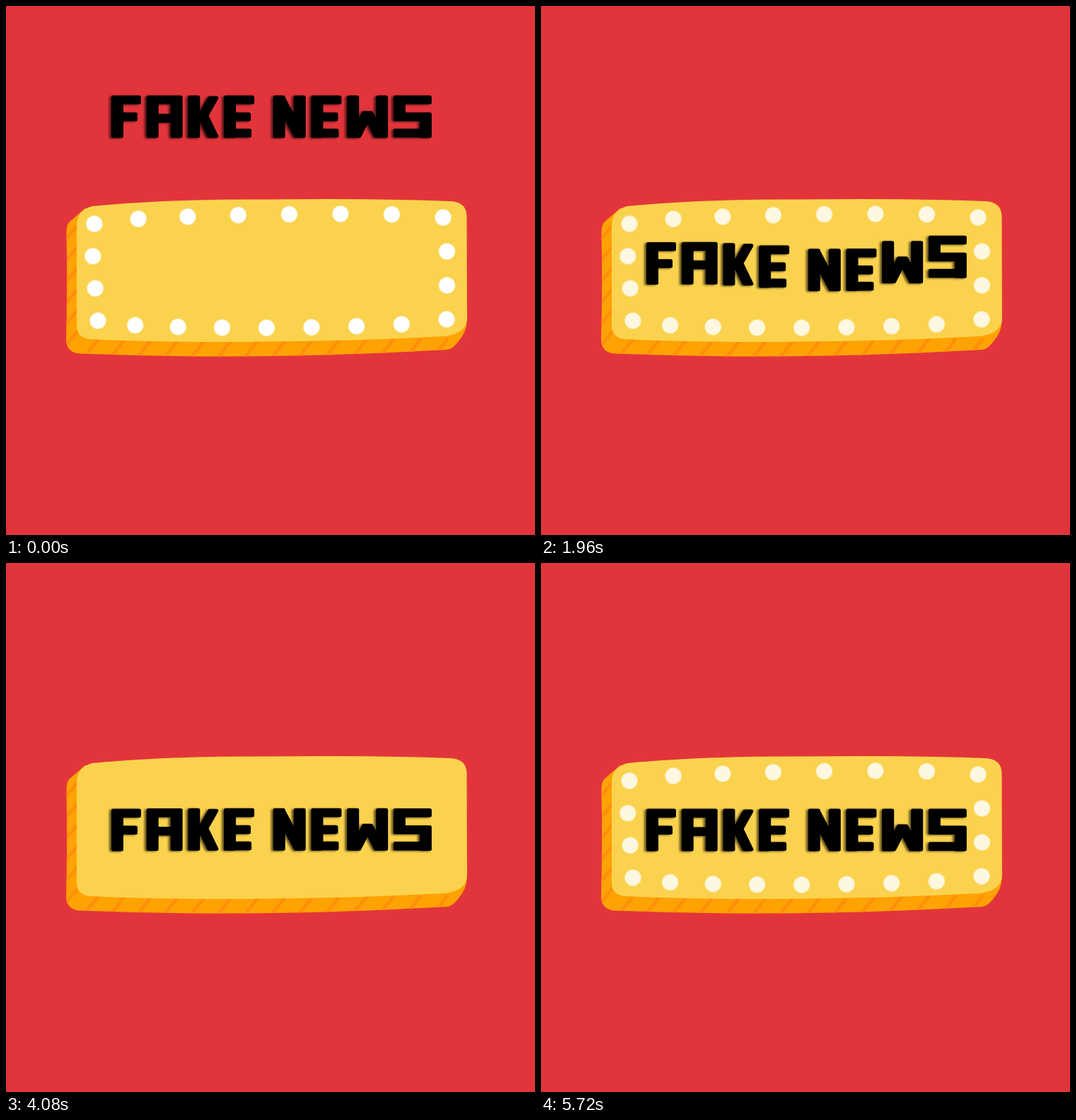
An HTML page for the animation above (5.76 s loop, 748 by 748 pixels).

```html
<!DOCTYPE html>
<html lang="en">
<head>
<meta charset="utf-8">
<title>FAKE NEWS</title>
<style>
html, body { margin: 0; width: 100%; height: 100%; overflow: hidden; background: #e2353b; }
svg { display: block; width: 100%; height: 100%; }
#letters path {
  stroke: #000; stroke-width: 5; stroke-linejoin: round;
  filter: drop-shadow(-2.5px 1.5px 1.5px rgba(0, 0, 0, .6));
}
</style>
</head>
<body>
<svg viewBox="0 0 748 748" role="img" aria-label="FAKE NEWS">
  <clipPath id="edge"><use href="#side"/></clipPath>
  <path id="side" fill="#ffa204" d="M112 286L90 305Q85 310 85.500 322Q87 400 85 473Q86 490 104 491.500Q320 500 545 490L624 486Q632 485 640 474Q652 460 651.500 445L640 300Z"/>
  <path id="stripes" clip-path="url(#edge)" stroke="#ff8f08" stroke-width="4.500"/>
  <path fill="#fbd24d" d="M100 310Q100 289 122 283Q220 273 374 273.500Q520 272 628 276Q651 277 651.500 297L652 441Q652 463 620 467Q500 474 300 475Q200 475 118 471Q100 469 100 452Z"/>
  <g id="lights" fill="#fff" stroke="#fff" stroke-opacity=".5" stroke-width="2"></g>
  <g id="letters"></g>
</svg>
<script>
const LOOP = 5760, FRAME = 40, BEAT = 480, DELAY = 60, DROP = 221;
const $ = id => document.getElementById(id);

function add(parent, tag, attrs) {
  const el = document.createElementNS('http://www.w3.org/2000/svg', tag);
  for (const name in attrs) el.setAttribute(name, attrs[name]);
  return parent.appendChild(el);
}

// Stripes along the bottom, then down the left side.
let stripes = '';
for (let x = 113; x < 620; x += 38) stripes += `M${x - 4} 498l22 -28`;
for (let y = 333; y < 490; y += 30) stripes += `M82 ${y}l22 -26`;
$('stripes').setAttribute('d', stripes);

// Bulbs first..last of n steps between two corners, bowed outwards by (bowX, bowY).
function bulbs(first, last, n, [x0, y0], [x1, y1], bowX, bowY) {
  for (let i = first; i <= last; i++) {
    const u = i / n;
    add($('lights'), 'circle', {
      r: 11,
      cx: x0 + (x1 - x0) * u + bowX * Math.sin(Math.PI * Math.sqrt(u)),
      cy: y0 + (y1 - y0) * u + bowY * Math.sqrt(Math.abs(Math.sin(Math.PI * u)))
    });
  }
}
const topLeft = [125, 308], topRight = [618, 299], lowLeft = [130, 445], lowRight = [623, 443];
bulbs(0, 7, 7, topLeft, topRight, -9, -8.5);
bulbs(0, 8, 8, lowLeft, lowRight, -10, 11);
bulbs(1, 2, 3, topLeft, lowLeft, -4, 0);
bulbs(1, 2, 3, topRight, lowRight, 4, 0);

// Letters are built from slabs: parallelograms with level tops, rounded by their stroke.
const TOP = 126.5, H = 60, STEM = 17, BAR = 12.5, MID = 24, LOW = 47, GAP = 7.7, SPACE = 19;
const slab = (x0, y0, x1, y1, w) =>
  `M${x0 + 2.5} ${y0 + 2.5}h${w - 5}L${x1 + w - 2.5} ${y1 - 2.5}h${5 - w}Z`;
const stem = (x, y0 = 0, y1 = H) => slab(x, y0, x, y1, STEM);
const bar = (y, w) => slab(0, y, 0, y + BAR, w);

const glyphs = {
  F: [42, w => stem(0) + bar(0, w) + bar(MID, w - 5)],
  A: [51, w => stem(0) + stem(w - STEM) + bar(0, w) + bar(MID + 2, w)],
  K: [43, w => stem(0) + slab(w - 15, 1, 11, 36, 15) + slab(12, MID, w - 16, H, 16)],
  E: [43, w => stem(0) + bar(0, w) + bar(MID, w - 5) + bar(LOW, w - 4)],
  N: [46, w => stem(0) + stem(w - STEM) + slab(0, 1, w - STEM, H, STEM)],
  W: [58, w => stem(0) + stem(w - STEM) + slab(w / 2 - 8, 22, 4, H, 16) + slab(w / 2 - 8, 22, w - 20, H, 16)],
  S: [54, w => bar(0, w) + bar(MID, w) + bar(LOW, w) + stem(0, 0, MID + BAR) + stem(w - STEM, MID)]
};

const letters = [];
let left = 149;
for (const char of 'FAKE NEWS') {
  if (char === ' ') { left += SPACE; continue; }
  const [width, shape] = glyphs[char];
  letters.push({ x: left, el: add($('letters'), 'path', { d: shape(width) }) });
  left += width + GAP;
}

// Equal-length parabolic bounces, each half as high as the one before.
function height(t) {
  if (t <= 0) return DROP;
  const bounce = Math.round(t / BEAT);
  const u = 2 * (t / BEAT - bounce);
  return DROP * 0.5 ** bounce * (1 - u * u);
}

function draw(now) {
  const t = Math.floor(now % LOOP / FRAME) * FRAME;
  $('lights').setAttribute('opacity', Math.abs(1 - 2 * (t % BEAT) / BEAT));
  letters.forEach(({ x, el }, i) =>
    el.setAttribute('transform', `translate(${x} ${TOP + DROP - height(t - i * DELAY)})`));
}

const start = performance.now();
function tick() {
  draw(performance.now() - start);
  requestAnimationFrame(tick);
}
tick();
</script>
</body>
</html>
```
